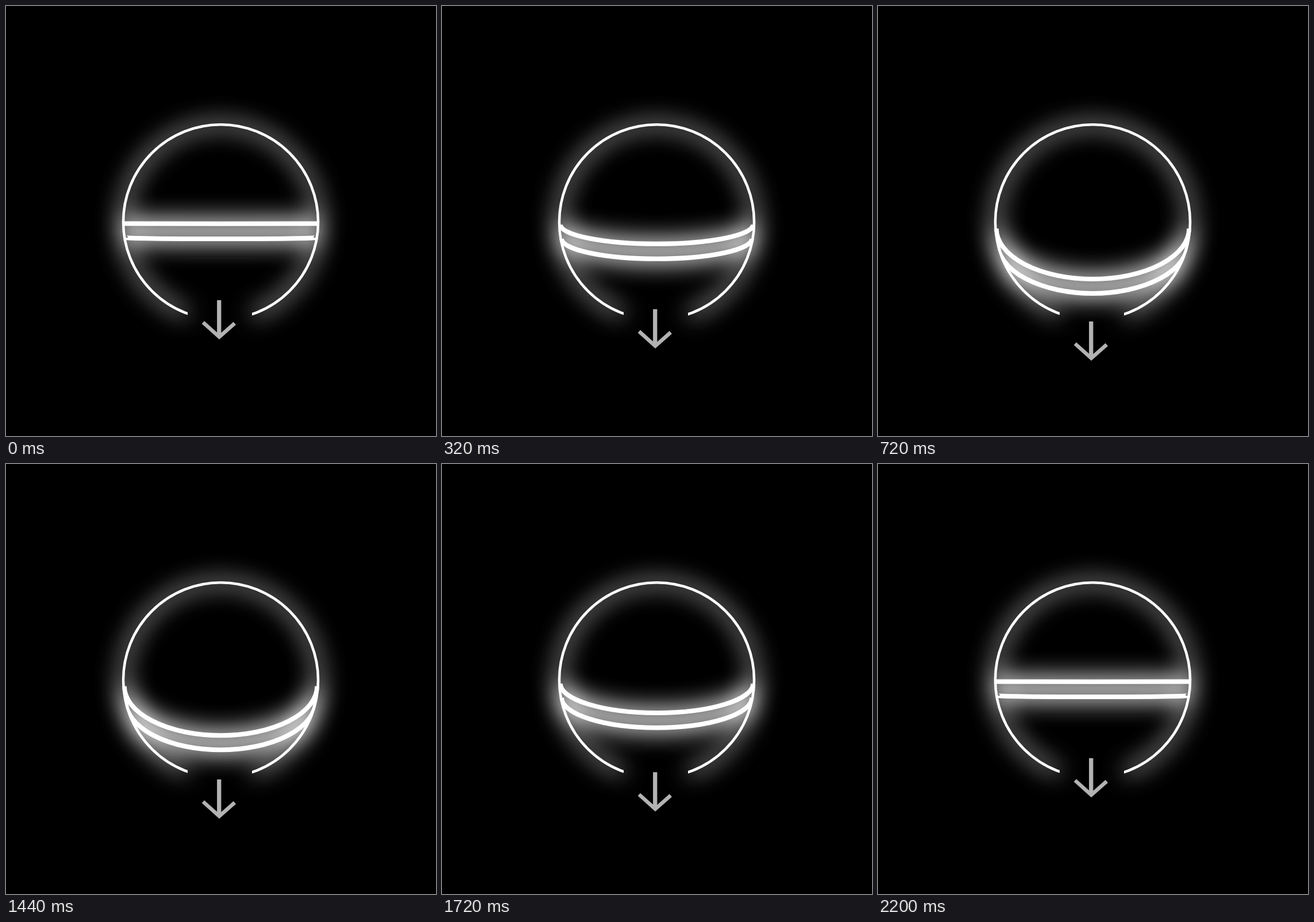
Write an HTML page that moves like this. It is 748 px wide and 748 px high and loops after 2.68 s.

```html
<!DOCTYPE html>
<html lang="en">
<head>
<meta charset="utf-8">
<title>Pull down</title>
<style>
  html, body { margin: 0; height: 100%; overflow: hidden; background: #000; }
  svg { display: block; width: 100%; height: 100%; }
</style>
</head>
<body>
<svg viewBox="0 0 748 748" fill="none" stroke="#fff">
  <defs>
    <filter id="glow" filterUnits="userSpaceOnUse" x="0" y="0" width="748" height="748" color-interpolation-filters="sRGB">
      <feGaussianBlur stdDeviation="20"/>
      <feComponentTransfer><feFuncA type="linear" slope="2.2"/></feComponentTransfer>
      <feMerge><feMergeNode/><feMergeNode in="SourceGraphic"/></feMerge>
    </filter>
    <clipPath id="gap"><path d="M0 0H748V748H428V510H316V748H0Z"/></clipPath>
    <clipPath id="disc"><circle cx="373.5" cy="375.7" r="171.7"/></clipPath>
  </defs>
  <g filter="url(#glow)">
    <circle cx="373.5" cy="375.7" r="169.5" stroke-width="4.5" clip-path="url(#gap)"/>
    <g stroke-width="8" clip-path="url(#disc)">
      <path id="upper"/>
      <path id="lower"/>
    </g>
  </g>
  <g id="arrow" stroke="#b3b3b3">
    <path d="M370.7 511.7V575" stroke-width="7.3"/>
    <path d="M342.8 550.3L371 575.6L397.8 552" stroke-width="6.5"/>
  </g>
</svg>
<script>
const LOOP = 2680, STEP = 40;
const upper = document.getElementById('upper');
const lower = document.getElementById('lower');
const arrow = document.getElementById('arrow');

// Progress from 0 to 1 between two times, with start and end speeds a and b.
function ease(time, from, to, a, b) {
  const t = Math.min(1, Math.max(0, (time - from) / (to - from)));
  return t * t * (3 - 2 * t) + a * t * (1 - t) ** 2 - b * t * t * (1 - t);
}

// Lower half of an ellipse hanging from height y down to height mid.
function bowl(rx, y, mid) {
  const ry = Math.max(0.3, mid - y);
  return `M${373.5 - rx} ${y}A${rx} ${ry} 0 0 0 ${373.5 + rx} ${y}`;
}

function draw() {
  const now = performance.now() % LOOP;
  const time = Math.floor((now + 0.5) / STEP) * STEP % LOOP;
  const pull = ease(time, 0, 720, 0.5, 1.09) - ease(time, 1420, 2200, 1.09, 0.59);
  const slide = ease(time, 0, 720, 0.3, 0.3) - ease(time, 1440, 2200, 0.5, 0.5);
  const drop = 8.5 * Math.max(0, pull) ** 1.6;
  upper.setAttribute('d', bowl(167.7, 378.5 + drop, 378.5 + 96.5 * pull));
  lower.setAttribute('d', bowl(165.5, 403 + drop, 405 + 95 * pull));
  arrow.setAttribute('transform', `translate(0 ${37 * slide})`);
  requestAnimationFrame(draw);
}
draw();
</script>
</body>
</html>
```
